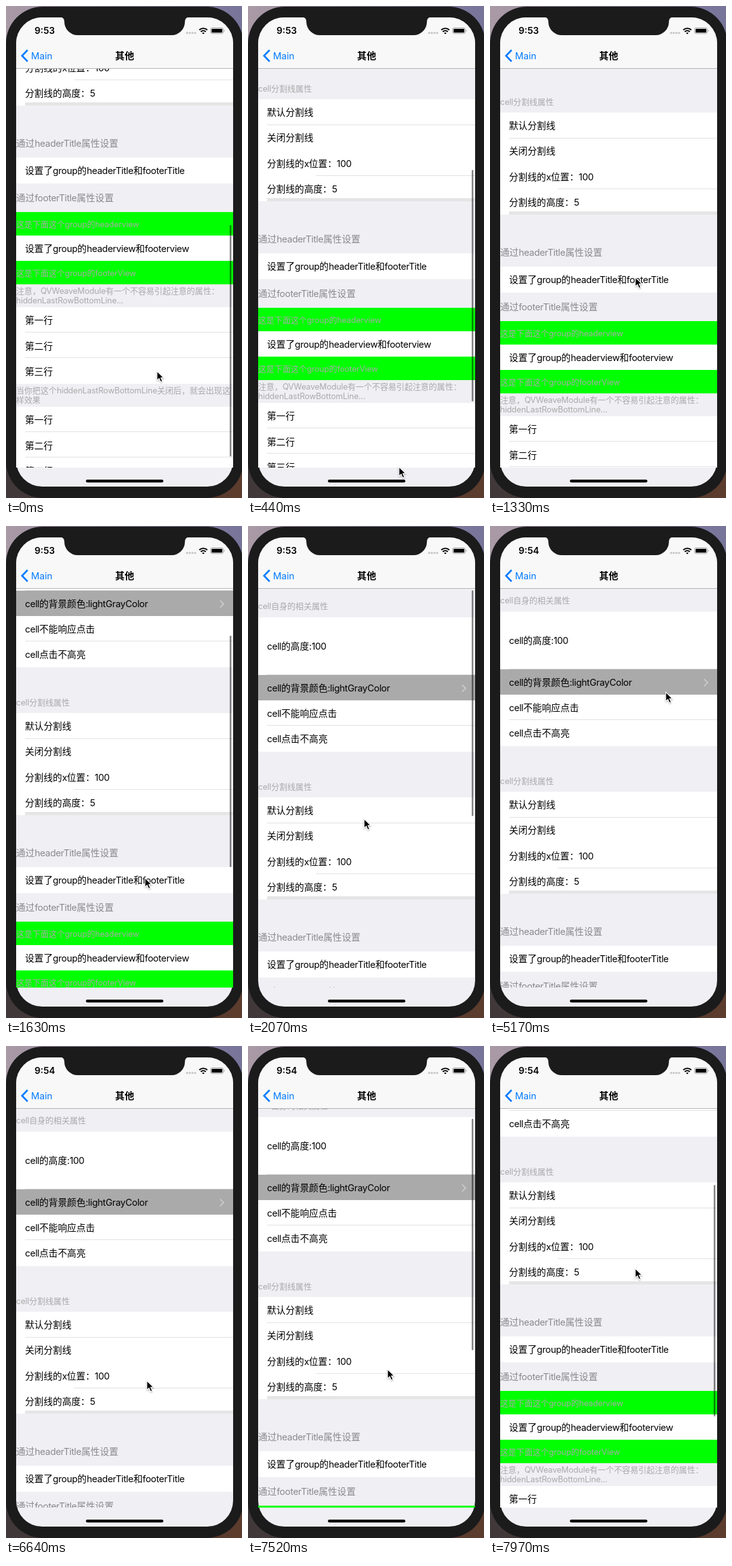
An HTML page that plays this animation: 372 by 776 pixels, repeating every 8000 ms.

```html
<!DOCTYPE html>
<html lang="zh-CN">
<head>
<meta charset="utf-8">
<title>Settings list</title>
<style>
  html, body { margin: 0; height: 100%; overflow: hidden; background: #1b1b1c; }
  svg { display: block; width: 372px; height: 776px; }
  text { font-family: Inter, "Noto Sans CJK SC", sans-serif; }
  .row, .title { font-size: 14.6px; }
  .title { fill: #8a8a8e; }
  .note { font-size: 12.8px; fill: #aaa; }
  .row tspan, .title tspan { letter-spacing: -.024em; }
  .note tspan { letter-spacing: -.01em; }
</style>
</head>
<body>
<svg viewBox="0 0 372 776">
  <defs>
    <linearGradient id="sky"><stop stop-color="#aa9aa6"/><stop offset="1" stop-color="#77749a"/></linearGradient>
    <linearGradient id="ground"><stop stop-color="#40383a"/><stop offset="1" stop-color="#5c3c2d"/></linearGradient>
    <clipPath id="table"><rect x="16" y="98" width="342" height="630"/></clipPath>
    <filter id="shadow" x="-50%" y="-50%" width="200%" height="200%">
      <feDropShadow dx="0" dy="1" stdDeviation="1" flood-opacity=".4"/>
    </filter>
  </defs>

  <rect width="372" height="388" fill="url(#sky)"/>
  <rect y="388" width="372" height="388" fill="url(#ground)"/>
  <rect y="1" width="374" height="775" rx="58" fill="#1b1b1c"/>
  <rect x="16" y="18" width="342" height="740" rx="41" fill="#efeff4"/>
  <path d="M16 98V59a41 41 0 0 1 41-41H317a41 41 0 0 1 41 41V98Z" fill="#f8f8f8"/>
  <path d="M85 17q7 1 7 8a21 21 0 0 0 21 21H261a21 21 0 0 0 21-21q0-7 7-8Z" fill="#1b1b1c"/>

  <g clip-path="url(#table)"><g id="list"></g></g>
  <path d="M16 98.5H358" stroke="#b2b2b2"/>
  <rect id="bar" x="352.7" width="2.5" rx="1.25" fill="#000" fill-opacity=".5"/>

  <text id="clock" x="45" y="44" font-size="14.5" font-weight="600"></text>
  <g fill="#c9c9cb"><circle cx="285.5" cy="42.5" r="1.8"/><circle cx="289.7" cy="42.5" r="1.8"/><circle cx="293.9" cy="42.5" r="1.8"/><circle cx="298.1" cy="42.5" r="1.8"/></g>
  <g fill="none" stroke="#000" stroke-width="2.1">
    <path d="M304.7 37.8a9 9 0 0 1 12.6 0M307 40.6a5.8 5.8 0 0 1 8 0"/>
    <path d="M309 42.6a3 3 0 0 1 4 0l-2 2Z" fill="#000" stroke="none"/>
  </g>
  <rect x="322.5" y="34.5" width="20" height="9" rx="2.6" fill="none" stroke="#999"/>
  <rect x="324" y="36" width="17" height="6" rx="1.3"/>
  <path d="M343.8 37.3q2 1.7 0 3.4Z" fill="#999"/>
  <path d="M34 69.5 25.3 78.5 34 87.5" fill="none" stroke="#007aff" stroke-width="2.7"/>
  <text x="39.5" y="84" font-size="14.7" fill="#007aff">Main</text>
  <text x="187" y="83.5" font-size="15" font-weight="600" text-anchor="middle">其他</text>
  <rect x="126" y="747" width="122" height="4.6" rx="2.3"/>

  <path id="cursor" d="M0 0V14.5L3.4 11.4 5.9 17 8.5 15.9 6.1 10.4H10.6Z"
    stroke="#fff" stroke-width="1.1" filter="url(#shadow)"/>
</svg>
<script>
const $ = id => document.getElementById(id);

const box = (y, height, fill = '#fff', x = 16) =>
  `<rect x="${x}" y="${y}" width="${358 - x}" height="${height}" fill="${fill}"/>`;
const line = (y, x = 30) => box(y, 1, '#e1e1e3', x);
const label = (kind, x, y, text) => {
  const spaced = text.replace(/[\x21-\x7e]+/g, '<tspan>$&</tspan>');
  return `<text class="${kind}" x="${x}" y="${y}">${spaced}</text>`;
};
// Text helpers take the vertical centre of the line.
const row = (y, text) => label('row', 30, y + 5.3, text);
const title = (y, text) => label('title', 16, y + 5.3, text);
const note = (y, text) => label('note', 16, y + 4.7, text);
const threeRows = y => box(y, 121) + ['第一行', '第二行', '第三行'].map((text, i) =>
  row(y + 21 + i * 40.2, text) + (i < 2 ? line(y + 39 + i * 40) : '')).join('');

$('list').innerHTML = [
  note(117, 'cell自身的相关属性'),
  box(135, 212), row(181, 'cell的高度:100'), line(225),
  box(226, 40, '#aaa'), row(247, 'cell的背景颜色:lightGrayColor'),
  '<path d="M337.5 241.5 343 247 337.5 252.5" fill="none" stroke="#d0d0d4" stroke-width="1.6"/>',
  row(287, 'cell不能响应点击'), line(305), row(327, 'cell点击不高亮'),
  note(402, 'cell分割线属性'),
  box(419, 161), row(440, '默认分割线'), line(459), row(480, '关闭分割线'),
  row(521, '分割线的x位置：100'), line(539, 107),
  row(561, '分割线的高度：5'), box(575, 5, '#e5e5e5', 30),
  title(640, '通过headerTitle属性设置'),
  box(662, 41), row(683, '设置了group的headerTitle和footerTitle'),
  title(725.5, '通过footerTitle属性设置'),
  box(748, 37, '#0f0'), note(767, '这是下面这个group的headerview'),
  box(785, 40), row(805.5, '设置了group的headerview和footerview'),
  box(825, 37, '#0f0'), note(844, '这是下面这个group的footerView'),
  note(872.5, '注意，QVWeaveModule有一个不容易引起注意的属性：'),
  note(887, 'hiddenLastRowBottomLine...'),
  threeRows(898),
  note(1029.5, '当你把这个hiddenLastRowBottomLine关闭后，就会出现这'),
  note(1044.5, '样效果'),
  threeRows(1055)
].join('');

// Tracks hold [step, value, ...]; the picture advances in steps of STEP ms.
const LOOP = 8000, STEP = 147.7;
const cursorTrack = [
  [0, 238, 576], [1, 238, 610], [3, 238, 727], [4, 238, 727], [7, 230, 460], [9, 229, 428],
  [10, 226, 470], [12, 212, 640], [13, 198, 560], [14, 183, 462], [16, 163, 480], [21, 163, 480],
  [22, 96, 237], [23, 88, 218], [24, 88, 218], [28, 71, 206], [29, 71, 206],
  [35, 277, 262], [37, 275, 286], [40, 262, 360], [45, 222, 528], [46, 231, 584],
  [47, 222, 533], [48, 222, 533], [50, 220, 510], [51, 219, 481], [54, 229, 351]
];
const scrollTrack = [
  [0, 423], [1, 389], [3, 272], [4, 256], [5, 251], [9, 251], [10, 209], [12, 39],
  [13, -16], [14, -9], [15, -4], [16, -1], [17, 0], [48, 0], [50, 23], [51, 52],
  [52, 95], [53, 145], [54, 204]
];
const barTrack = [[0, 1], [6, 1], [8, 0], [9, 0], [10, 1], [16, 1], [18, 0], [48, 0], [49, 1], [54, 1]];

function sample(track, step) {
  const next = track.findIndex(key => key[0] >= step);
  if (next < 1) return track.at(next).slice(1);
  const a = track[next - 1], b = track[next];
  const mix = (step - a[0]) / (b[0] - a[0]);
  return a.slice(1).map((value, i) => value + (b[i + 1] - value) * mix);
}

function draw(now) {
  const step = Math.floor((now % LOOP + 6) / STEP);
  const [x, y] = sample(cursorTrack, step);
  const scroll = Math.round(sample(scrollTrack, step)[0]);
  $('cursor').setAttribute('transform', `translate(${x} ${y})`);
  $('list').setAttribute('transform', `translate(0 ${-scroll})`);
  $('bar').setAttribute('y', 101.5 + 0.577 * Math.max(scroll, 0));
  $('bar').setAttribute('height', 365 + Math.min(scroll, 0));
  $('bar').setAttribute('opacity', sample(barTrack, step)[0]);
  $('clock').textContent = step < 26 ? '9:53' : '9:54';
}

const start = performance.now();
function tick() {
  draw(performance.now() - start);
  requestAnimationFrame(tick);
}
tick();
</script>
</body>
</html>
```
